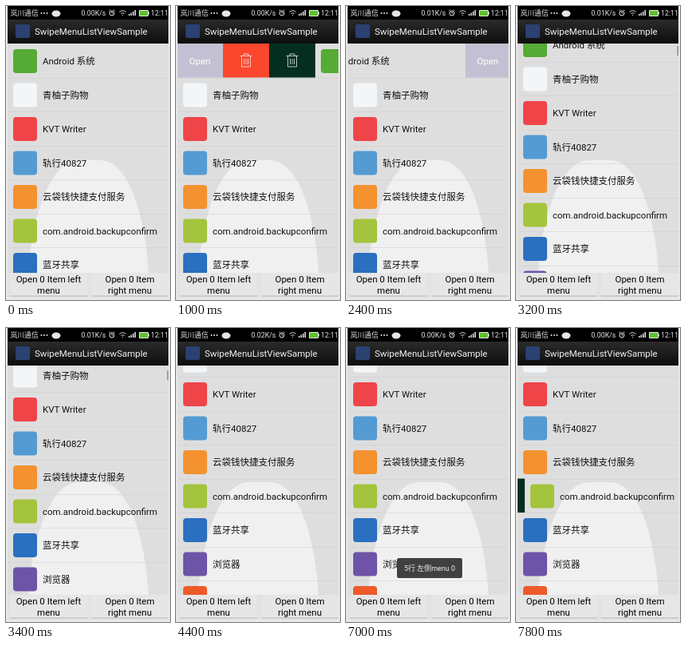
Write an HTML page that moves like this. It is 206 px wide and 368 px high and loops after 8 s.

```html
<!DOCTYPE html>
<html lang="zh">
<head>
<meta charset="utf-8">
<style>
html, body { margin: 0; width: 206px; height: 368px; overflow: hidden; background: #e8e8e8; }
svg { display: block; font: 11.5px Roboto, "Noto Sans CJK SC", "Noto Sans CJK", sans-serif; }
.status { font-size: 8.8px; fill: #e6e6e6; }
.line { fill: none; stroke: #e6e6e6; }
.mid { text-anchor: middle; }
.trash { fill: none; stroke: #fff; stroke-opacity: .7; }
</style>
</head>
<body>
<svg width="206" height="368" viewBox="0 0 206 368">
  <defs>
    <clipPath id="screen"><path d="M2 47H204V334H2z"/></clipPath>
    <linearGradient id="head" x2="0" y2="1"><stop stop-color="#2b2b2b"/><stop offset="1" stop-color="#0d0d0d"/></linearGradient>
    <g id="bin" class="trash">
      <path d="M-7.5-5.500H7.500M-3-5.500V-8H3V-5.500M-5.500-5.500V8H5.500V-5.500M-2.500-2V5M0-2V5M2.500-2V5"/>
    </g>
    <g id="leftMenu">
      <path fill="#c2c0d2" d="M-172-1h58v42.5h-58z"/>
      <path fill="#fa472d" d="M-114-1h58v42.5h-58z"/>
      <path fill="#042f20" d="M-56-1h58v42.5h-58z"/>
      <text class="mid" x="-143" y="25" fill="#fff">Open</text>
      <use href="#bin" x="-85" y="20"/>
      <use href="#bin" x="-27" y="20"/>
    </g>
    <g id="rightMenu">
      <path fill="#c2c0d2" d="M207-1h58v42.5h-58z"/>
      <text class="mid" x="235" y="25" fill="#fff">Open</text>
    </g>
  </defs>

  <path fill="#dedede" d="M2 47H204V365H2z"/>
  <path fill="#f0f0f0" d="M28 334C32 265 55 193 92 193H118C152 193 174 255 179 334z"/>
  <g clip-path="url(#screen)">
    <g id="list"></g>
    <path id="bar" fill="#8c8c8c" d="M202.5 0h1.5v12h-1.5z"/>
  </g>

  <path d="M2 0H204V17H2z"/>
  <g class="status">
    <text x="5.5" y="12.3">岚川通信</text>
    <circle cx="44.5" cy="9" r="1"/><circle cx="48" cy="9" r="1"/><circle cx="51.5" cy="9" r="1"/>
    <ellipse cx="63" cy="9.5" rx="5.5" ry="4"/>
    <text id="speed" x="94.5" y="12"></text>
    <text x="204" y="12" text-anchor="end">12:11</text>
    <path d="M154 12v-2h1.5v2zM156.5 12V8.5h1.5V12zM159 12V7h1.5v5zM161.5 12V5h1.5v7z"/>
    <path fill="#5fc12f" d="M168 6h10v6h-10z"/>
  </g>
  <g class="line">
    <circle cx="133" cy="9" r="3"/>
    <path d="M133 7v2h1.5M129.500 6l1.500-1.500M136.500 6l-1.500-1.500M142.500 7.500q4-3.500 8 0M144.500 9.500q2-1.500 4 0M146 11.500h1"/>
    <path d="M167.500 5.500h11v7h-11zM179.500 7.500v3"/>
  </g>
  <path fill="url(#head)" d="M2 17H204V47H2z"/>
  <rect x="12" y="23" width="18" height="17" rx="2" fill="#2a4172"/>
  <text x="36" y="35.5" fill="#f2f2f2">SwipeMenuListViewSample</text>

  <path fill="#e2e2e2" d="M2 334H204V365H2z"/>
  <g id="buttons"></g>

  <g id="toast">
    <rect x="64" y="288" width="82" height="25" rx="2.5" fill="#404040"/>
    <text class="mid" x="105" y="303.5" font-size="9" fill="#eee">5行 左侧menu 0</text>
  </g>
</svg>
<script>
const $ = id => document.getElementById(id);
const PITCH = 42.5, TOP = 48, LOOP = 8000;

const items = [
  ['Android 系统', '#55ab35'],
  ['青柚子购物', '#f3f6f8'],
  ['KVT Writer', '#ef4549'],
  ['轨行40827', '#549bd3'],
  ['云袋钱快捷支付服务', '#f3922f'],
  ['com.android.backupconfirm', '#a3c43c'],
  ['蓝牙共享', '#2a6fc0'],
  ['浏览器', '#6d54a8'],
  ['', '#ee5a2a']
];

$('list').innerHTML = items.map(([name, color], i) => `
  <g transform="translate(0 ${i * PITCH})">
    <path fill="#cdcdcd" d="M2 42H204v.6H2z"/>
    <g class="row">
      <use href="#leftMenu"/>
      <rect x="9" y="6" width="30" height="30" rx="4" fill="${color}"/>
      <text x="46" y="25" fill="#111">${name}</text>
      <use href="#rightMenu"/>
    </g>
  </g>`).join('');
const rows = document.querySelectorAll('.row');

const buttons = [[5, 'Open 0 Item left', 'menu'], [107, 'Open 0 Item', 'right menu']];
$('buttons').innerHTML = buttons.map(([x, top, bottom]) => `
  <rect x="${x}" y="334" width="97" height="29.5" rx="1" fill="#b9b9b9"/>
  <rect x="${x}" y="334" width="97" height="28.5" rx="1" fill="#e6e6e6"/>
  <text class="mid" x="${x + 48.5}" y="346">${top}</text>
  <text class="mid" x="${x + 48.5}" y="360">${bottom}</text>`).join('');

// start time, swiped row, its shift, list scroll
const poses = [
  [0, 0, 0, 0],
  [600, 0, 59, 0],
  [1000, 0, 173, 0],
  [1800, 0, 165, 0],
  [2000, 0, -57, 0],
  [3200, 0, 0, 20],
  [3400, 5, 0, 52],
  [3800, 5, 0, 71],
  [5600, 5, 171, 71],
  [6200, 5, 173, 71],
  [7000, 5, 0, 71],
  [7800, 5, 9, 71]
];
const speeds = [[0, '0.00'], [2400, '0.01'], [4400, '0.02'], [7000, '0.00']];
const at = (steps, t) => steps.findLast(s => s[0] <= t);
const show = (id, on) => $(id).setAttribute('visibility', on ? 'visible' : 'hidden');
const move = (el, x, y) => el.setAttribute('transform', `translate(${x} ${y})`);

function draw() {
  const t = performance.now() % LOOP;
  const [, active, shift, scroll] = at(poses, t);
  move($('list'), 0, TOP - scroll);
  rows.forEach((row, i) => move(row, i === active ? shift : 0, 0));
  move($('bar'), 0, TOP + scroll * .1);
  show('bar', t >= 3200 && t < 4000);
  show('toast', t >= 7000 && t < 7200);
  $('speed').textContent = at(speeds, t)[1] + 'K/s';
  requestAnimationFrame(draw);
}
draw();
</script>
</body>
</html>
```
